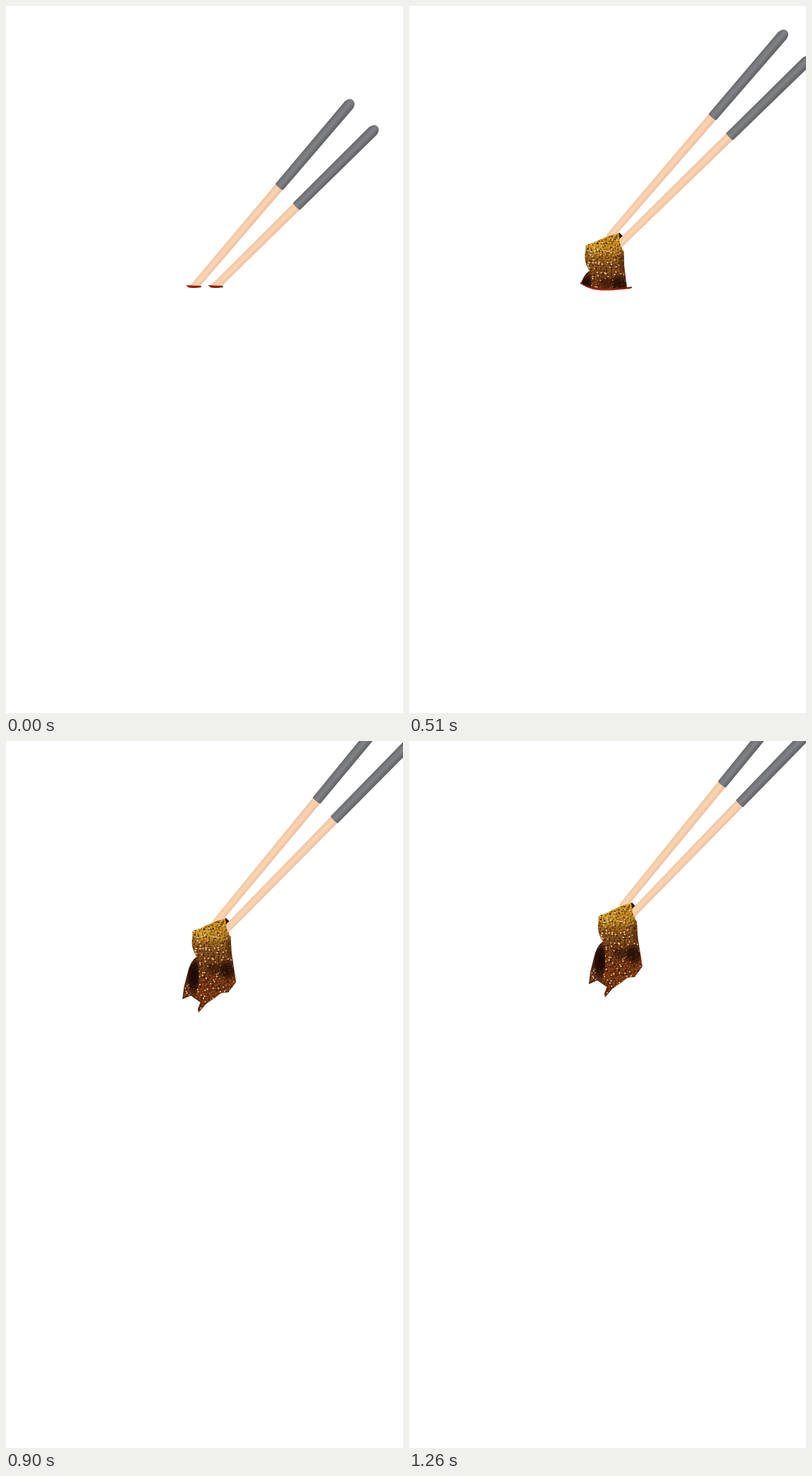
Write an HTML page with a canvas that moves like this. It is 561x998 px and loops after 1890 ms.

```html
<!DOCTYPE html>
<html lang="en">
<head>
<meta charset="utf-8">
<title>Chopsticks</title>
<style>
  html, body { margin: 0; height: 100%; overflow: hidden; background: #fff; }
  canvas { display: block; }
</style>
</head>
<body>
<canvas id="stage" width="561" height="998"></canvas>
<script>
const ctx = document.getElementById('stage').getContext('2d');
const LOOP = 1890, STEP = 30, GRAB = 270, END = 1260;
const PIVOT = [442, 61];
const mix = (a, b, u) => a + (b - a) * u;

function gradient(x0, y0, x1, y1, colors) {
  const g = ctx.createLinearGradient(x0, y0, x1, y1);
  colors.forEach((c, i) => g.addColorStop(i / (colors.length - 1), c));
  return g;
}

const grey = gradient(-8, 0, 8, 0, ['#636468', '#77787c', '#818286', '#6e6f73', '#5c5d61']);
const wood = gradient(-7, 0, 7, 0, ['#e8bfa2', '#f6cdaa', '#fad5b0', '#f5c8a6', '#e8baa0']);
const meat = gradient(290, 232, 298, 360,
  ['#cc9420', '#b57c20', '#84501c', '#6a3714', '#743512', '#7a3810', '#5a240a']);

// Shapes in the coordinates of the final pose
const flap = new Path2D('M306 233 L315 228 L321 234 L319 251 L314 256 Z');
const lobe = new Path2D('M275 283 Q265 290 262 306 L257 326 L255 342 L266 337 L279 346 L286 330 L284 290 Z');
const slice = new Path2D('M268 247 L283 241 L297 234 L314 229 L317 247 L322 255 L323 275 L326 295 ' +
  'L330 318 L319 333 L309 334 L300 341 L288 349 L277 362 L276 357 L280 346 L273 339 L277 320 L277 296 L274 283 ' +
  'Q267 273 267 262 Z');

function random(seed) {
  return () => {
    seed = (seed * 1664525 + 1013904223) % 4294967296;
    return seed / 4294967296;
  };
}

function stick(x, y, degrees, length) {
  ctx.save();
  ctx.translate(x, y);
  ctx.rotate(degrees * Math.PI / 180);
  ctx.fillStyle = wood;
  ctx.fill(new Path2D(`M-6.5 -1 L6.5 -1 L5.3 ${length} L-5.3 ${length} Z`));
  ctx.fillStyle = grey;
  ctx.fill(new Path2D('M-7 0 L-7.7 -152 Q-6 -161 0 -161 Q6 -161 7.7 -152 L7 0 Q0 2 -7 0 Z'));
  ctx.restore();
}

function shade(x, y, rx, ry, rgb, alpha) {
  ctx.save();
  ctx.translate(x, y);
  ctx.scale(rx, ry);
  const g = ctx.createRadialGradient(0, 0, 0, 0, 0, 1);
  g.addColorStop(0, `rgba(${rgb},${alpha})`);
  g.addColorStop(0.5, `rgba(${rgb},${alpha * 0.85})`);
  g.addColorStop(1, `rgba(${rgb},0)`);
  ctx.fillStyle = g;
  ctx.fillRect(-1, -1, 2, 2);
  ctx.restore();
}

// Jittered rows of sesame-like glints with dark gaps between them
function speckle() {
  const rnd = random(7);
  for (let y = 228, row = 0; y < 364; y += 3.4, row++) {
    for (let x = 254 + row % 2 * 2.2; x < 332; x += 4.4) {
      const px = x + rnd() * 3, py = y + rnd() * 3, bright = rnd();
      ctx.fillStyle = `rgba(42,16,4,${0.4 + rnd() * 0.5})`;
      ctx.fillRect(px + 1.4, py + 0.8, 1 + rnd() * 1.8, 1 + rnd() * 1.8);
      ctx.fillStyle = bright > 0.7 ? '#f3dcae' : y < 262 ? '#e6b93c' : '#b06a32';
      ctx.beginPath();
      ctx.arc(px, py, 0.5 + bright * 0.6, 0, 7);
      ctx.fill();
    }
  }
}

function food() {
  ctx.save();
  ctx.clip(lobe);
  ctx.fillStyle = '#7a3d14';
  ctx.fillRect(250, 280, 40, 70);
  speckle();
  shade(270, 310, 13, 32, '26,9,3', 1);
  ctx.restore();
  ctx.strokeStyle = '#4a1e0a';
  ctx.lineWidth = 1.4;
  ctx.stroke(lobe);

  ctx.save();
  ctx.clip(slice);
  ctx.fillStyle = meat;
  ctx.fillRect(250, 220, 85, 150);
  shade(283, 250, 18, 12, '232,184,60', 0.5);
  speckle();
  shade(317, 301, 15, 16, '30,10,3', 0.85);
  shade(299, 300, 13, 11, '40,15,4', 0.55);
  shade(322, 268, 9, 22, '60,26,6', 0.6);
  ctx.restore();
}

function pose(t) {
  if (t < GRAB) {
    const u = t / GRAB;
    return [mix(-56, -23, u), mix(194, 165, u), mix(1.2, 2.6, u)];
  }
  const k = t >= END ? 0 : ((1270 - t) / 1000) ** 2;
  return [-23 * k, 165 * k, 2.6 * k];
}

// Ends of the broth line: [time, left x, left y, right x, right y]
const broth = [[0, 258, 395, 305, 396], [270, 258, 395, 305, 396], [510, 242, 391, 315, 397],
  [660, 240, 391, 303, 394], [780, 268, 398, 276, 398], [LOOP, 268, 398, 276, 398]];

function brothAt(t) {
  const i = broth.findIndex(key => key[0] > t);
  const a = broth[i - 1], b = broth[i], u = (t - a[0]) / (b[0] - a[0]);
  return a.slice(1).map((v, j) => mix(v, b[j + 1], u));
}

function ring(x) {
  ctx.fillStyle = '#b3280c';
  ctx.fill(new Path2D(`M${x - 11} 394 L${x + 11} 395 Q${x + 8} 398 ${x} 398 Q${x - 9} 398 ${x - 11} 394 Z`));
  ctx.fillStyle = '#6f1206';
  ctx.fillRect(x - 8, 396, 18, 1.3);
}

function draw(t) {
  const [dx, dy, turn] = pose(t);
  const [x0, y0, x1, y1] = brothAt(t);
  const curve = `C${x0 + 14} ${y0 + 9} ${mix(x0, x1, 0.5)} 401 ${x1} ${y1}`;
  const afloat = t >= 240;

  ctx.fillStyle = '#fff';
  ctx.fillRect(0, 0, 561, 998);
  ctx.save();
  if (!afloat) {
    ctx.beginPath();
    ctx.rect(0, 0, 561, 396);
    ctx.clip();
  } else if (t < 780) {
    ctx.clip(new Path2D(`M0 0 L0 ${y0} L${x0} ${y0} ${curve} L561 ${y1} L561 0 Z`));
  }
  ctx.translate(PIVOT[0] + dx, PIVOT[1] + dy);
  ctx.rotate(turn * Math.PI / 180);
  ctx.translate(-PIVOT[0], -PIVOT[1]);
  stick(442, 61.5, 39.2, 224);
  ctx.fillStyle = '#2b1007';
  ctx.fill(flap);
  stick(467, 88.5, 44.2, 220);
  food();
  ctx.restore();

  if (!afloat) {
    ring(265.5);
    ring(296.5);
  } else if (t < 780) {
    const low = mix(x0, x1, 0.5);
    ctx.fillStyle = '#a82c0c';
    ctx.fill(new Path2D(`M${x0} ${y0 - 1} ${curve} L${x1 - 2} ${y1 + 2} ` +
      `C${low} 403 ${x0 + 12} ${y0 + 13} ${x0} ${y0 - 1} Z`));
    ctx.strokeStyle = '#7d1c08';
    ctx.lineWidth = 1.5;
    ctx.stroke(new Path2D(`M${x0} ${y0} ${curve}`));
  }
}

function tick() {
  draw(Math.floor(performance.now() % LOOP / STEP) * STEP);
  requestAnimationFrame(tick);
}
tick();
</script>
</body>
</html>
```
